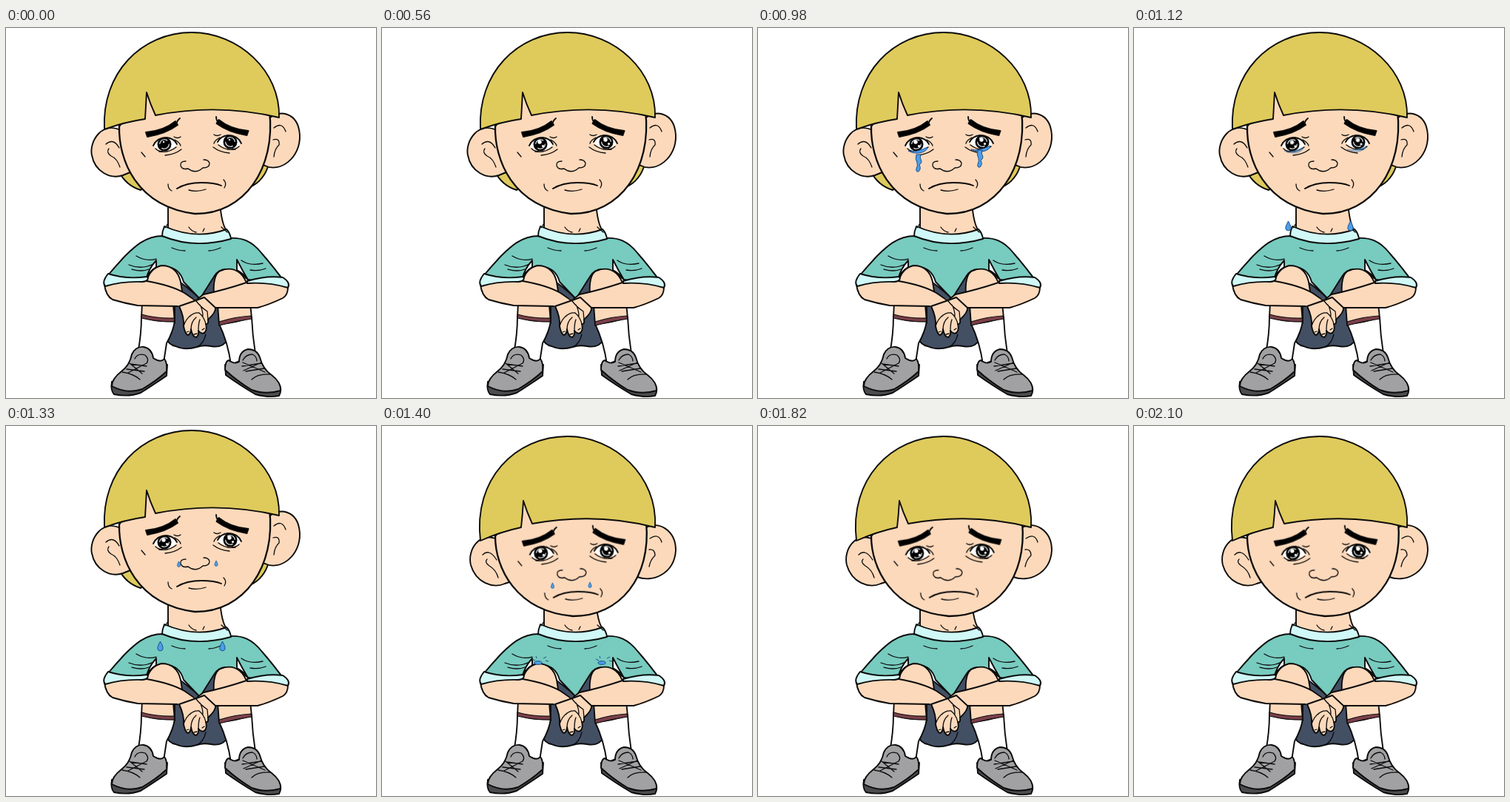
Recreate the animation shown at these times as an HTML page without scripts. Size 500x500 px, loop 2.17 s.

```html
<!DOCTYPE html>
<html lang="en">
<head>
<meta charset="utf-8">
<title>Sad boy</title>
<style>
html, body { margin: 0; width: 100%; height: 100%; overflow: hidden; background: #fff; }
svg { display: block; width: 100vw; height: 100vh; }
.ink { stroke: #0b0b0b; stroke-width: 1.9; stroke-linecap: round; stroke-linejoin: round; }
.line { fill: none; }
.thin { fill: none; stroke-width: 1.3; }
.skin { fill: #fdd9bb; }
.hair { fill: #dfca5c; }
.shirt { fill: #78cbbf; }
.trim { fill: #cff8f6; }
.shorts { fill: #434f63; }
.sock { fill: #fff; }
.shoe { fill: #a1a1a3; }
.sole { fill: #4c4c4f; }
.tear { fill: #4b9fe6; stroke: #1d4f8c; stroke-width: 1; stroke-linejoin: round; }

.anim, .anim g { animation: 2.17s step-end infinite; }
.anim .up { animation-name: up; }
.anim .down { animation-name: down; }
.anim .face { animation-name: nod; }
.anim .dull { animation-name: dull; }
.anim .shine { animation-name: shine; }
.anim .glint { animation-name: glint; }
.anim .pool { animation-name: pool; }
.anim .stream { animation-name: stream; transform-origin: 0 165px; }
.anim .drops { animation-name: fall; }
.anim .small { animation-name: trickle; }
.anim .splash { animation-name: splash; }
.anim .still { animation: none; }

@keyframes up { 0% { visibility: visible } 64.5%, 100% { visibility: hidden } }
@keyframes down { 0% { visibility: hidden } 64.5%, 100% { visibility: visible } }
@keyframes nod { 0% { transform: none } 64.5%, 100% { transform: translate(.8px, 14.8px) } }
@keyframes dull { 0% { opacity: 1 } 25.8%, 100% { opacity: 0 } }
@keyframes shine { 0% { opacity: 0 } 25.8%, 100% { opacity: 1 } }
@keyframes glint {
  0%, 32.2%, 45.1%, 58%, 64.5%, 83.8%, 96.7%, 100% { transform: none }
  29%, 38.7%, 51.6%, 70.9%, 77.4%, 90.3% { transform: translate(.5px, .4px) }
}
@keyframes pool {
  0% { opacity: 0 } 29% { opacity: .5 } 32.2% { opacity: 1 }
  51.6% { opacity: .5 } 54.8%, 100% { opacity: 0 }
}
@keyframes stream {
  0% { opacity: 0; transform: scaleY(0) }
  32.2% { opacity: 1; transform: scaleY(.15) }
  35.4% { opacity: 1; transform: scaleY(.35) }
  38.7% { opacity: 1; transform: scaleY(.55) }
  41.9% { opacity: 1; transform: scaleY(.78) }
  45.1% { opacity: 1; transform: none }
  48.3% { opacity: 1; transform: scaleY(.45) }
  51.6%, 100% { opacity: 0; transform: none }
}
@keyframes fall {
  0% { opacity: 0; transform: translateY(195px) }
  48.3% { opacity: 1; transform: translateY(263px) }
  51.6% { opacity: 1; transform: translateY(268px) }
  54.8% { opacity: 1; transform: translateY(275px) }
  58% { opacity: 1; transform: translateY(285px) }
  61.2% { opacity: 1; transform: translateY(298px) }
  64.5%, 100% { opacity: 0; transform: translateY(318px) }
}
@keyframes trickle {
  0% { opacity: 0; transform: translate(3px, 165px) }
  54.8% { opacity: 1; transform: translate(2px, 172px) }
  58% { opacity: 1; transform: translate(1px, 179px) }
  61.2% { opacity: 1; transform: translate(0, 187px) }
  64.5% { opacity: 1; transform: translate(-3px, 216px) }
  67.7% { opacity: 1; transform: translate(-4px, 223px) }
  70.9% { opacity: .6; transform: translate(-4px, 230px) }
  74.1%, 100% { opacity: 0; transform: translate(-4px, 236px) }
}
@keyframes splash {
  0% { opacity: 0; transform: none }
  64.5% { opacity: 1; transform: none }
  67.7% { opacity: .7; transform: translateY(2px) }
  70.9% { opacity: .3; transform: translateY(3px) }
  74.1%, 100% { opacity: 0; transform: none }
}
</style>
</head>
<body>
<svg viewBox="0 0 500 500" preserveAspectRatio="none">
<defs>
  <g id="eye">
    <path fill="#fff" stroke="none" d="M199 158Q204 148 217 148Q229 150 231 158Q224 166 213 166Q203 165 199 158Z"/>
    <circle cx="214" cy="157" r="8.6"/>
    <circle class="line" cx="214" cy="157" r="6.3" stroke="#fff" stroke-width="1.1" stroke-dasharray="13 7"/>
    <path class="line" d="M199 159Q204 148 217 148Q227 149 231 157"/>
    <path class="thin" d="M202 163Q206 167 212 167M207 167Q220 169 230 161M215 172Q228 171 237 164M228 151Q235 155 236 159M227 147Q232 150 236 147"/>
  </g>
  <path id="brow" d="M189 141Q213 139 229 126L232 131Q216 143 191 147Z"/>
  <path id="drop" class="tear" d="M0-7Q4 0 3.6 3A3.7 3.7 0 0 1-3.6 3Q-4 0 0-7Z"/>
  <path id="pool" class="tear" d="M203 166Q213 169 229 161Q229 165 222 168Q212 171 203 166Z"/>
  <path id="stream" class="tear" d="M214 171L220 171Q218 175 221 180Q221 183 218 185Q221 190 217 194Q213 195 214 190Q216 186 215 182Q212 177 214 171Z"/>
  <g id="splat">
    <ellipse class="tear" cx="211" cy="320" rx="5" ry="2.3"/>
    <path class="tear" d="M203 315l4 2M218 314l4-2M221 317l4 1M209 314l-1-3" stroke-width="2"/>
  </g>
</defs>

<g class="ink">
  <!-- neck -->
  <path class="skin" d="M219 235L219 274Q258 287 298 274Q291 264 289 235Z"/>
  <path class="thin" d="M247 269Q251 275 257 276M268 271L266 275"/>

  <!-- shorts and legs -->
  <path class="shorts" d="M228 338L244 350L262 365L286 325L290 395L299 422Q292 433 277 430Q266 428 258 431Q242 436 229 430Q220 428 218 421L228 393Z"/>
  <path class="thin" d="M258 431Q267 427 270 414"/>
  <path class="skin" d="M184 370L226 374L228 398L183 392Z"/>
  <path class="skin" d="M286 374L330 372L332 392L288 401Z"/>
  <path class="sock" d="M183 390Q204 398 228 396Q226 410 217 426L213 452L178 440Q183 414 183 390Z"/>
  <path class="sock" d="M288 400Q312 398 332 391Q333 415 337 440L304 455Q300 425 288 400Z"/>
  <path fill="#7a3f49" stroke-width="1.2" d="M183 387Q205 393 228 392L227 397Q204 397 183 392ZM288 397Q310 390 331 389L332 393Q310 396 288 402Z"/>

  <!-- shoes -->
  <path class="sole" d="M143 478Q141 490 146 495Q166 499 182 493Q198 483 217 470L218 455L190 465Z"/>
  <path class="shoe" d="M143 484Q143 474 156 464Q167 456 170 441Q175 430 186 431Q197 433 199 446Q209 453 214 447Q218 452 217 464Q203 477 184 488Q164 495 143 484Z"/>
  <path class="sole" d="M296 455L297 469Q315 482 337 495Q355 500 369 497Q373 490 370 483L330 470Z"/>
  <path class="shoe" d="M296 462Q296 450 301 449Q309 455 315 451Q315 437 327 434Q339 434 343 445Q347 461 359 469Q372 479 371 490Q350 496 332 489Q312 477 296 462Z"/>
  <path class="thin" d="M174 447Q178 439 188 442Q194 448 190 453M163 461L187 464M168 454L190 457M165 466L190 453M167 453L184 467M157 465Q172 467 181 475M320 449Q324 441 333 441Q339 444 339 450M319 457L345 453M324 464L349 460M321 463L345 452M320 452L350 465M332 475Q340 467 357 468"/>

  <!-- shirt -->
  <path class="shirt" d="M212 281C188 281 173 296 160 309Q148 322 137 335L190 341L205 324Q233 318 240 343L262 366L281 336Q291 318 317 332L327 340L380 348Q361 322 346 305C332 287 318 283 303 284Q257 298 212 281Z"/>
  <path class="trim" d="M214 268Q211 275 211 281Q254 299 304 285Q303 277 298 272Q257 287 214 268Z"/>
  <path class="thin" d="M219 264L215 270M291 269L299 276M166 320Q183 327 199 319M170 326Q184 330 193 326M176 308Q189 316 203 312M224 297Q233 301 242 301M318 314Q329 322 347 318M330 327Q341 329 351 325M290 297Q281 301 274 301"/>
  <path fill="#fff" d="M203 314Q192 326 189 341Q193 329 203 323ZM312 313Q319 327 328 342Q322 332 312 327Z"/>

  <!-- knees -->
  <path class="skin" d="M190 343Q194 325 210 321Q231 321 236 343L239 362L190 364Z"/>
  <path class="skin" d="M281 362Q279 333 290 328Q305 322 316 331Q323 337 326 348L322 364Z"/>

  <!-- arms -->
  <path class="skin" stroke="none" d="M133 346L190 341Q220 348 239 357L263 371L268 385L232 376L178 375Q145 370 138 364Z"/>
  <path class="skin" stroke="none" d="M381 350L325 343Q295 353 266 361L257 368L263 387L282 378L340 379Q366 372 377 364Z"/>
  <path class="line" d="M133 347Q135 362 144 367Q160 372 178 375L232 376M190 342Q224 348 241 358L257 369M381 350Q381 361 374 365Q355 374 340 378L281 378M325 344Q295 354 267 360L259 366"/>
  <path class="trim" d="M138 332Q162 340 191 336Q194 342 184 343Q157 342 134 349Q129 343 138 332Z"/>
  <path class="trim" d="M326 342Q352 334 374 337Q385 344 381 351Q354 343 326 345Z"/>

  <!-- hands -->
  <path class="skin" d="M234 376Q241 391 240 403Q242 414 246 415Q250 413 250 407Q252 418 257 418Q261 415 260 409Q265 415 269 411Q272 407 270 400Q274 401 273 394Q284 384 283 378L268 364L257 368Z"/>
  <path class="thin" d="M240 403Q243 393 250 388M250 407Q250 397 257 391M260 409Q260 399 262 394M270 400Q268 391 261 385Q254 384 248 390M257 369Q263 377 272 383L273 394M262 374Q266 381 266 389M244 411L247 410M254 414L258 413M265 408L268 406"/>
</g>

<g class="anim">
  <g class="ink still">
    <!-- raised head -->
    <g class="up">
      <path class="hair" d="M152 193Q162 213 182 219L200 200Z"/>
      <path class="hair" d="M355 184Q349 206 330 215L315 190Z"/>
      <path class="skin" d="M170 145L155 138C129 126 112 154 116 172C120 194 141 205 158 199L180 190Z"/>
      <path class="skin" d="M340 140L355 123C367 110 395 112 397 145C398 176 370 196 350 186L330 180Z"/>
      <path class="thin" d="M135 157Q145 148 153 162M139 163Q135 168 142 173Q150 176 154 188M362 135Q373 126 378 140M361 151Q370 148 369 158Q363 163 362 174"/>
      <path class="skin" stroke-width="2.3" d="M153 133C152 178 176 241 255 251C322 252 365 190 356 112L188 80Z"/>
      <path class="hair" d="M133 137C129 61 183 6 251 6C314 6 371 58 369 121C315 108 258 107 202 118Q195 103 190 87Q189 105 188 123Q160 127 133 137Z"/>
    </g>
    <!-- lowered head -->
    <g class="down">
      <path class="skin" d="M175 160L156 153C131 142 115 168 120 188C127 212 150 220 166 213L190 205Z"/>
      <path class="skin" d="M340 150L356 138C372 127 397 140 397 168C395 200 365 212 345 204L330 195Z"/>
      <path class="thin" d="M136 174Q145 165 155 181M142 180Q138 184 145 189Q154 194 157 205M362 152Q374 144 378 157M361 167Q369 166 369 175Q363 180 361 190"/>
      <path class="skin" stroke-width="2.3" d="M153 149C153 191 180 250 258 257C322 257 364 205 357 130L189 94Z"/>
      <path class="hair" d="M133 155C123 72 180 14 251 14C314 14 373 68 369 137C315 123 258 122 203 132Q196 117 191 101Q190 120 188 137Q160 143 133 155Z"/>
    </g>

    <g class="face">
      <use href="#brow"/>
      <use href="#brow" transform="matrix(-1 0 0 1 516.5 -2)"/>
      <path class="line" d="M235 122Q230 126 230 132M284 120Q284 126 289 130"/>
      <use href="#eye"/>
      <use href="#eye" transform="matrix(-1 0 0 1 517 -3)"/>
      <g class="dull" fill="#fff" stroke="none">
        <circle cx="213" cy="154" r="1.2"/><circle cx="302" cy="151" r="1.2"/>
      </g>
      <g class="shine" fill="#fff" stroke="none">
        <g class="glint">
          <circle cx="213" cy="154" r="2.7"/>
          <circle cx="217.5" cy="159.5" r="1.6"/>
          <circle cx="302" cy="151" r="2.7"/>
          <circle cx="306.5" cy="156.5" r="1.6"/>
        </g>
      </g>
      <path class="thin" d="M183 168L188 174M243 180Q235 180 236 186Q238 192 246 190Q256 198 266 189Q275 189 275 183Q274 178 267 178M219 211Q219 218 224 220M294 205Q299 210 295 216M247 219Q258 222 270 218"/>
      <path class="line" d="M231 217Q244 209 264 209Q282 209 291 213"/>
    </g>
  </g>

  <!-- tears -->
  <g class="pool"><use href="#pool"/><use href="#pool" x="85" y="-2"/></g>
  <g class="stream"><use href="#stream"/><use href="#stream" x="83" y="-6"/></g>
  <g class="drops"><use href="#drop" x="208.5"/><use href="#drop" x="292.5"/></g>
  <g class="small">
    <use href="#drop" transform="translate(233.5 0) scale(.6)"/>
    <use href="#drop" transform="translate(284 -1) scale(.6)"/>
  </g>
  <g class="splash"><use href="#splat"/><use href="#splat" x="86"/></g>
</g>
</svg>
</body>
</html>
```
